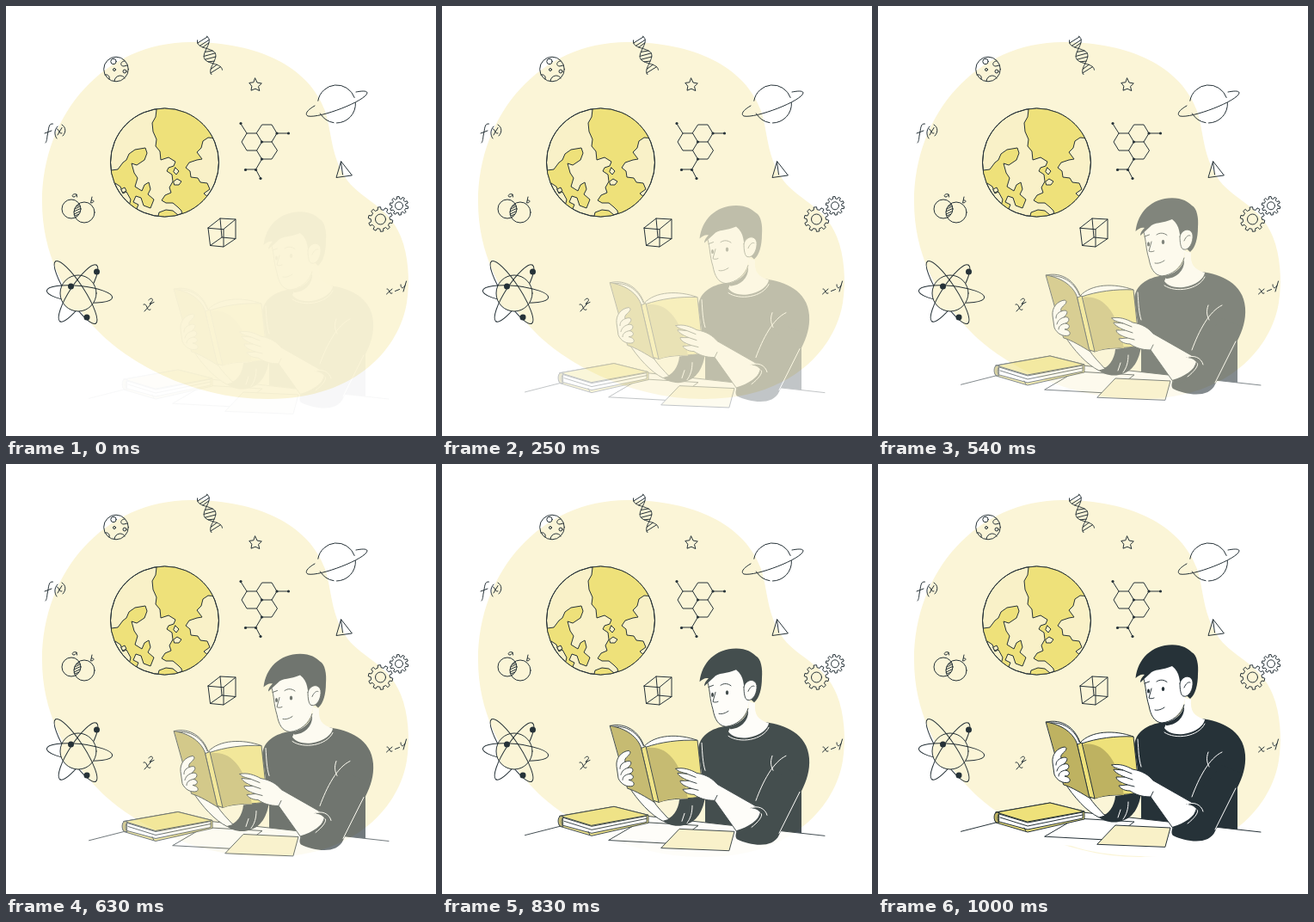
An HTML page that plays this animation: 500 by 500 pixels, repeating every 1.04 s.

```html
<!DOCTYPE html>
<html lang="en">
<head>
<meta charset="utf-8">
<title>Student reading</title>
<style>
  html, body { margin: 0; width: 100%; height: 100%; overflow: hidden; background: #fff; }
  svg { display: block; width: 100vw; height: 100vh; }
  .line { fill: none; stroke: #263238; stroke-width: 1; stroke-linecap: round; stroke-linejoin: round; }
  .ink { fill: #263238; }
  .white { fill: #fff; }
  .gold { fill: #eee17a; }
  .ochre { fill: #beb261; }
  .pale { fill: #f9f1c8; }
  .fold { fill: none; stroke: #fff; stroke-width: 1; stroke-linecap: round; }
</style>
</head>
<body>
<svg viewBox="0 0 500 500">
  <defs>
    <clipPath id="disc"><circle cx="184.5" cy="182" r="63"/></clipPath>
    <clipPath id="lens"><circle cx="76" cy="236" r="11"/></clipPath>
  </defs>

  <path fill="#fbf5d7" d="M42 228C42 125 115 42 215 42C292 42 352 70 371 122C379 146 377 175 397 203C415 226 445 233 459 268C468 290 470 320 466 345C458 395 410 457 305 457C210 457 138 409 110 381C66 337 42 285 42 228Z"/>

  <!-- globe -->
  <g class="line">
    <circle class="pale" cx="184.5" cy="182" r="63"/>
    <g class="gold" clip-path="url(#disc)">
      <path d="M176 112L174 129 170 136 171 146 175 155 174 163 179 169 180 179 189 176 197 181 195 186 189 188 187 192 193 196 194 204 190 211 192 217 185 220 181 226 186 229 194 229 200 234 204 238 206 250 235 250 237 224 230 218 237 213 234 206 226 205 223 200 215 199 214 192 209 188 213 182 222 179 228 178 222 170 227 165 229 157 235 153 248 154 250 110Z"/>
      <path d="M115 192L130 190 136 182 140 179 143 172 150 167 162 165 164 171 161 179 152 185 146 183 149 194 153 200 150 210 158 215 161 208 166 205 168 213 165 219 172 225 168 235 160 232 157 223 151 221 148 228 154 231 150 240 143 233 145 225 140 216 136 218 133 210 127 206 122 212 110 205Z"/>
      <path d="M176 248L178 240 186 237 194 238 200 243 196 250Z"/>
    </g>
    <g class="pale">
      <path d="M197 188L201 192 198 196 195 193Z"/>
      <path d="M195 204L199 201 204 204 201 208 196 208Z"/>
      <path d="M134 213L138 211 140 215 136 217Z"/>
    </g>
    <circle cx="184.5" cy="182" r="63"/>
  </g>

  <!-- floating symbols -->
  <g class="line">
    <circle cx="128" cy="73.5" r="14.3"/>
    <circle cx="125" cy="64.5" r="3.2"/><circle cx="126" cy="74" r="1.5"/><circle cx="138" cy="76" r="2"/>
    <path d="M138 64C133 64 132 70 137 70L141 69M115 80C119 79 121 82 120 85M126 87C127 80 136 79 138 84"/>
    <path id="dna"/>
    <path d="M289.7 84L292 89 297.3 90 293.5 93.6 294.8 98.6 290 96.2 285 98.2 285.8 93.2 282.8 89.4 287.5 88.8Z"/>
    <path d="M362.8 110.2A22 22 0 0 1 405.2 106.5M406.4 112.5A22 22 0 0 1 384.5 136M381 135.7A22 22 0 0 1 365.4 125M359 116C350 121 347 126 351 128C365 131 419 110 420 101C420 98 412 99 407 100"/>
    <path d="M54.5 137C49 136 50 143 48 151C47.5 156 47 158 46 159M45 148L53 145M60 140C56 144 56 150 59 154M59.5 143C62 143 61 149 65 148M65 141.5L60 150M65 138C70 141 70 147 66 151"/>
    <path d="M298 138H309L315 148 309 158H297.5L291.5 148ZM291.5 148H280L274 158 280 168H291.5L297.5 158M309 158L315.5 168 309 178H297.5L291.5 168M280 148L273 137M315 148H328M297.5 178L290.5 190H278M290.5 190L296 200.5"/>
    <path d="M389.5 181L384 199.5 402 197ZM389.5 181L391.5 196"/>
    <path id="gears"/>
    <circle cx="435.5" cy="248" r="6"/><circle cx="457" cy="232.3" r="4.5"/>
    <path d="M443 329C446 328 445 336 449 334M449 329L442.5 335M452.5 331.5L457.5 329.5M459 324C459 329 462 329 464 325M465.5 320L462 332"/>
    <path d="M160 347C165 345 163 356 168 353M169 346L161 355M166 342C168 338 173 341 169 344L167 346.5 172 344.5"/>
    <circle cx="76" cy="236" r="11"/><circle cx="91" cy="240" r="12"/>
    <path clip-path="url(#lens)" d="M82 233L90 229M80 236L90 231M79 239L90 234M79 242L90 237M80 244L90 240M81 246L90 243"/>
    <path d="M82 219C78 217 75 222 79 222C81 222 82 219 82 219L82.5 222M100 222L98.5 229C103 229 103 225 99.5 226"/>
    <path d="M235 258L249 247 267 248 253 259.5ZM235 258L237.5 278.5 253 280 253 259.5M267 248L267 270.5 253 280M249 247L251 269 267 270.5M251 269L237.5 278.5"/>
    <g id="orbits"></g>
  </g>
  <g class="ink" id="dots"></g>

  <!-- reader and desk -->
  <g id="reader">
    <path class="white" d="M96 427L137 417 238 405 445 428C415 450 370 460 305 456C270 455 245 451 225 444C180 440 135 438 96 427Z"/>
    <path class="line" d="M96.5 427.3L137 417M238 405L445 428"/>

    <g class="line">
      <path class="white" d="M194 433L230 412 298 416 270 437Z"/>
      <path class="pale" d="M255 442L276 420 340 423 334 445Z"/>
      <path class="gold" d="M137 405L200 394 240 404 240 413 174 428 137 417C135 414 135 408 137 405Z"/>
      <path class="white" d="M141 407L174 417 238 405V412L174 425 141 416Z"/>
      <path class="gold" d="M138 405L200 394 240 404 174 416Z"/>
      <path d="M142 411L174 421 238 408M172 427L170 423"/>
      <path class="ochre" d="M138 405C134 406 134 415 138 417L141 417C138 414 139 408 141 406Z"/>
    </g>

    <!-- sweater -->
    <path class="ink" d="M332 300C312 303 299 312 298 328L306 384V412.5L418 425V376C424 364 428 352 427 338C425 309 398 299 377 296Z"/>
    <path class="ink" d="M276 386L306 382C304 398 297 413 280 416C270 418 261 414 257 411C268 408 275 398 276 386Z"/>
    <path class="ink" d="M365 390L400 350 423 360C415 383 400 412 392 427C385 443 360 440 343 432C341 430 341 426 343 422Z"/>

    <!-- head -->
    <path class="white" d="M333 307L337 297C355 296 356 284 357 272L364 274C363 287 367 293 380 297C377 313 343 321 333 307Z"/>
    <path class="ink" d="M333 301C344 299 353 292 356 282C357 295 346 304 335 304Z"/>
    <path class="white" d="M308 247C312 258 311 268 315 281C317 292 321 300 330 301C342 300 355 289 357 272L363 250 345 232 320 238Z"/>
    <path class="line" d="M309 250C312 260 311 268 315 281C317 292 321 300 330 301C342 300 353 291 356 280"/>
    <path class="ink" d="M299.5 249C302 227 318 210.300 342 210.300C354 210.300 361 215 365 219C371 222 373 234 372 244C372 257 369 268 363 273L353 264C350 252 352 243 342 235C331 240 321 238 316 244L305 254C305 250 308 247 310 245C306 244 303 246 299.5 249Z"/>
    <path class="line white" d="M351 255C353 246 364 244 366 253C367 261 362 272 355 270C352 269 351 262 351 255"/>
    <path class="line" d="M310 255L315.5 253M324 253C328 250 333 251 336 253.5M318 261L315 272C316 273 319 273 321 272M322 286C326 287 330 285 333 283M356 260C358 255 361 253 363 254"/>
    <g class="ink"><ellipse cx="314.5" cy="264" rx="1.5" ry="2.6"/><ellipse cx="331.5" cy="261.5" rx="1.7" ry="2.6"/></g>
    <path class="fold" d="M333 312C346 321 373 317 380 302M400 335C385 342 373 365 365 387M384 335C381 343 383 348 385 352M416 377L392 425M302 320C303 334 303 342 306 352M291 393C291 401 289 408 285 413M282 402L279 411"/>

    <!-- far forearm -->
    <path class="line white" d="M216 369C228 388 243 404 257 411L264 409C258 402 250 395 245 386L232 370Z"/>

    <!-- open book -->
    <g class="line">
      <path class="white" d="M196 300C213 296 229 306 235 324C248 310 275 309 297 317L296 322 238 330Z"/>
      <path class="ochre" d="M195.5 300C214 303 228 313 232 327L247 389C237 383 226 376 216 373Z"/>
      <path class="gold" d="M237 325C254 319 276 316 297 317L304 382C288 386 267 383 252 389Z"/>
      <path class="ochre" stroke="none" d="M238 326C262 322 279 343 286 385C272 384 263 385 252 389Z"/>
      <path class="gold" d="M232 326L237 324 252 389 246 387Z"/>
      <path d="M201 301C217 300 229 310 234 323"/>
    </g>

    <!-- hands and near forearm -->
    <g class="line">
      <path class="white" d="M217 329C208 330 202 338 203 347L205 361C208 368 215 372 222 370C225 367 222 364 217 363C224 363 224 357 218 356C224 354 223 347 216 349C222 344 221 339 213 342C211 337 219 335 219 331Z"/>
      <path d="M213 342C208 344 207 347 207 350M216 349C210 351 209 354 208 357M218 356C212 357 210 360 210 363"/>
      <path class="white" d="M272 350C280 348 289 351 296 355C308 357 315 362 320 368L371 397C370 409 358 422 344 425L317 387C306 387 299 384 293 380C285 380 281 376 280 374L290 373C281 370 277 367 277 364L287 364C279 361 274 357 274 355L285 356C279 354 273 353 272 350Z"/>
      <path d="M285 356L295 360M287 364L296 367M290 373L298 375M317 387L320 381"/>
    </g>
    <path class="ink" d="M358 396C365 392 376 395 379 402C371 409 365 424 346 427L342 422C357 418 368 409 371 402C368 398 364 396 358 396Z"/>
    <path class="fold" d="M359 396C367 392 376 396 378 404M371 402C374 404 368 412 360 418"/>
  </g>
</svg>
<script>
  const get = id => document.getElementById(id);
  const polyline = points => "M" + points.map(p => p.map(v => v.toFixed(2)).join(" ")).join("L");

  // Helix point: distance s along the axis, side -1 or 1
  function helix(s, side) {
    const w = side * 7 * Math.sin(Math.PI * (s - 13) / 19);
    return [228 + s * 0.4 + w * 0.917, 37.5 + s * 0.917 - w * 0.4];
  }
  const strand = side => polyline(Array.from({ length: 44 }, (_, s) => helix(s, side)));
  const rungs = [2, 6, 9, 17, 21, 25, 29, 36, 40].map(s => polyline([helix(s - 1, -1), helix(s + 1, 1)]));
  get("dna").setAttribute("d", strand(1) + strand(-1) + rungs.join(""));

  function gear(x, y, outer, inner, teeth) {
    const points = [];
    for (let i = 0; i < teeth; i++) {
      [[-0.27, inner], [-0.19, outer], [0.19, outer], [0.27, inner]].forEach(([shift, r]) => {
        const a = (i + shift) * 2 * Math.PI / teeth + 0.2;
        points.push([x + r * Math.cos(a), y + r * Math.sin(a)]);
      });
    }
    return polyline(points) + "Z";
  }
  get("gears").setAttribute("d", gear(435.5, 248, 14.3, 11.3, 10) + gear(457, 232.3, 10.8, 8.3, 10));

  // Each orbit has one half behind the nucleus and one in front
  const orbits = [[85.5, 335, 38.3, 9.5, 6], [81, 333, 43, 10, 57], [84, 334, 39, 10, -57]];
  const halves = sweep => orbits.map(([x, y, rx, ry, turn]) =>
    `<path transform="translate(${x} ${y}) rotate(${turn})" d="M${-rx} 0A${rx} ${ry} 0 0 ${sweep} ${rx} 0"/>`).join("");
  get("orbits").innerHTML = halves(0) + '<circle cx="84" cy="334" r="21" fill="#fbf5d7"/>' + halves(1);

  const addDots = (r, points) => points.forEach(([x, y]) => {
    get("dots").innerHTML += `<circle cx="${x}" cy="${y}" r="${r}"/>`;
  });
  addDots(1.6, [[273, 136.5], [315, 148], [328.5, 148], [297.5, 158], [297.5, 178], [290.5, 190.5], [278.5, 190.5], [296, 200.5]]);
  addDots(3.5, [[105.5, 309], [75.5, 326], [94, 362]]);

  // The reader fades in and rises at 24 steps per second
  const LOOP = 1040, START = 0.033, STEPS = 24.3, RISE = 30;
  const reader = get("reader");
  function draw() {
    const step = Math.floor((performance.now() % LOOP + 5) * 24 / 1000);
    const p = Math.min(1, START + step / STEPS);
    reader.setAttribute("opacity", p);
    reader.setAttribute("transform", `translate(0 ${RISE * (1 - p)})`);
    requestAnimationFrame(draw);
  }
  draw();
</script>
</body>
</html>
```
